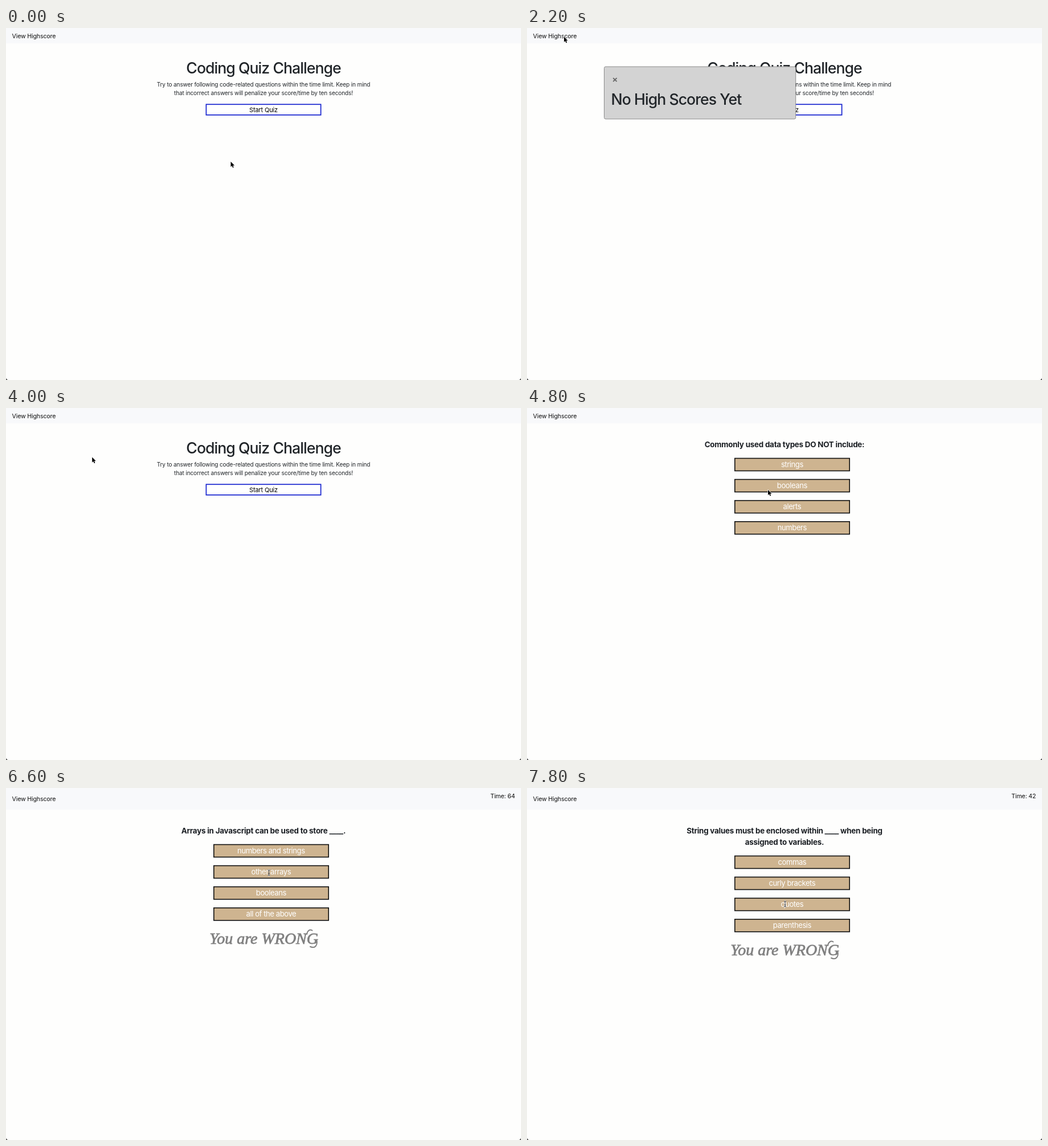
These frames come from a looping animation (904x619 px, 8 s). An HTML page:

```html
<!DOCTYPE html>
<html lang="en">
<head>
<meta charset="utf-8">
<title>Coding Quiz</title>
<style>
html, body { margin: 0; width: 100%; height: 100%; overflow: hidden; background: #fefefd; }
svg { display: block; width: 100vw; height: 100vh; }
text { font-family: Inter, sans-serif; font-optical-sizing: none; fill: #111; white-space: pre; }
.mid { text-anchor: middle; }
.end { text-anchor: end; }
.nav { font-size: 10.65px; letter-spacing: -.016em; }
.head { font-size: 26.7px; font-weight: 500; letter-spacing: -.037em; fill: #212529; }
.body { font-size: 10.05px; letter-spacing: -.013em; fill: #212529; }
.start { font-size: 11px; letter-spacing: -.016em; fill: #000; }
.ask { font-size: 13.4px; font-weight: 700; letter-spacing: -.0175em; fill: #1b1f24; }
.choice { font-size: 13.1px; letter-spacing: -.034em; fill: #fff; }
.verdict { font: italic 28px "Liberation Serif", serif; fill: #808080; stroke: #808080; stroke-width: .8; }
.swash { fill: none; stroke: #808080; stroke-width: 2; stroke-linecap: round; }
</style>
</head>
<body>
<svg id="stage" viewBox="0 0 904 619"></svg>
<script>
const LOOP = 8000, STEP = 200;
const stage = document.getElementById("stage");

const questions = [
  { at: 4800, ask: ["Commonly used data types DO NOT include:"],
    choices: ["strings", "booleans", "alerts", "numbers"] },
  { at: 5600, ask: ["The condition in an if / else statement is enclosed within ____."],
    choices: ["quotes", "curly brackets", "parentheses", "square brackets"] },
  { at: 6400, ask: ["Arrays in Javascript can be used to store ____."],
    choices: ["numbers and strings", "other arrays", "booleans", "all of the above"] },
  { at: 7000, ask: ["String values must be enclosed within ____ when being", "assigned to variables."],
    choices: ["commas", "curly brackets", "quotes", "parenthesis"] }
];

// time, seconds left on the clock
const clock = [[6000, 64], [6800, 53], [7800, 42]];

// time, x, y of the pointer
const path = [
  [0, 394.5, 235], [1200, 65, 15.5], [2600, 65, 15.5], [2800, 68, 17.5],
  [3600, 151.2, 86.5], [4000, 151.2, 86.5], [4600, 423, 144], [4800, 423, 144],
  [5200, 469, 104], [5400, 470.5, 104], [5800, 471, 112.5],
  [6200, 461.5, 149], [7000, 461.5, 149], [7400, 453, 204], [LOOP, 453, 204]
];

const text = (cls, x, y, s) => `<text class="${cls}" x="${x}" y="${y}">${s}</text>`;

const box = (x, y, w, h, fill, stroke, sw, r = 0) =>
  `<rect x="${x}" y="${y}" width="${w}" height="${h}" rx="${r}" fill="${fill}" stroke="${stroke}" stroke-width="${sw}"/>`;

const latest = (list, t, time) => list.filter(item => time(item) <= t).pop();

function pointerAt(t) {
  const i = path.findIndex(key => key[0] > t);
  const [t0, x0, y0] = path[i - 1], [t1, x1, y1] = path[i];
  const u = (t - t0) / (t1 - t0), e = u * u * (3 - 2 * u);
  return [x0 + (x1 - x0) * e, y0 + (y1 - y0) * e];
}

function pointer(t) {
  const [x, y] = pointerAt(t);
  const beam = "M-2 -5Q0 -5 0 -3.6Q0 -5 2 -5M0 -3.6V3.6M-2 5Q0 5 0 3.6Q0 5 2 5M-1 1.6H1";
  const arrow = "M0 0V9.2L2.1 7.3L3.6 10.7L5.2 10L3.7 6.7H6.6Z";
  const shape = t >= 6200
    ? `<path d="${beam}" fill="none" stroke="#fff" stroke-width="2"/><path d="${beam}" fill="none" stroke="#111" stroke-width=".9"/>`
    : `<path d="${arrow}" stroke="#fff" stroke-width="1.3" stroke-linejoin="round" paint-order="stroke"/>`;
  return `<g transform="translate(${x} ${y})">${shape}</g>`;
}

function header(t) {
  const tick = latest(clock, t, c => c[0]);
  return `<rect width="904" height="${tick ? 38 : 27}" fill="#f8f9fb"/>` +
    text("nav", 10.6, tick ? 23 : 17.5, "View Highscore") +
    (tick ? text("nav end", 893.4, 17.5, "Time: " + tick[1]) : "");
}

const intro = () =>
  text("head mid", 452, 80.4, "Coding Quiz Challenge") +
  text("body mid", 452, 103.2, "Try to answer following code-related questions within the time limit. Keep in mind") +
  text("body mid", 452, 118.1, "that incorrect answers will penalize your score/time by ten seconds!") +
  box(351.4, 134.3, 201.2, 18.6, "#fff", "#1522cf", 1.7) +
  text("start mid", 452, 147.8, "Start Quiz");

const popup = () =>
  box(135.5, 68, 336.2, 92, "#d3d3d3", "#8c8c8c", 1, 2.5) +
  `<path d="M151.2 87.8L157.6 94.2M157.6 87.8L151.2 94.2" stroke="#666" stroke-width="1.9"/>` +
  text("head", 147.6, 135, "No High Scores Yet");

const verdict = () =>
  text("verdict mid", 452.6, 263.3, "You are WRONG") +
  `<path class="swash" d="M528 246C529 240 533 237 537.5 239.5M545.5 257C547 265 543 272 534 268"/>`;

function quiz(q, t) {
  const drop = t >= clock[0][0] ? 11 : 0;
  const line = 20;
  const extra = (q.ask.length - 1) * line;
  const asks = q.ask.map((s, i) => text("ask mid", 452, 68.9 + i * line, s)).join("");
  const rows = q.choices.map((label, i) => {
    const y = 87.7 + i * 37.1;
    return box(364.8, y + .8, 201.4, 22, "#ceb490", "#101010", 1.6) +
      text("choice mid", 465.4, y + 16.4, label);
  }).join("");
  return `<g transform="translate(0 ${drop})">${asks}<g transform="translate(0 ${extra})">` +
    rows + (q === questions[0] ? "" : verdict()) + "</g></g>";
}

const corners = `<path d="M0 615.5V619H3.5Q.6 618.4 0 615.5ZM904 615.5V619H900.5Q903.4 618.4 904 615.5Z" fill="#333"/>`;

function draw(t) {
  const q = latest(questions, t, item => item.at);
  const open = t >= 1800 && t < 3800;
  stage.innerHTML = `<rect width="904" height="619" fill="#fefefd"/>` + header(t) +
    (q ? quiz(q, t) : intro()) + (open ? popup() : "") + corners + pointer(t);
}

const began = performance.now();
let shown = -1;

function tick(now) {
  const t = Math.floor(Math.max(0, now - began) % LOOP / STEP) * STEP;
  if (t !== shown) draw(shown = t);
  requestAnimationFrame(tick);
}
tick(began);
</script>
</body>
</html>
```
